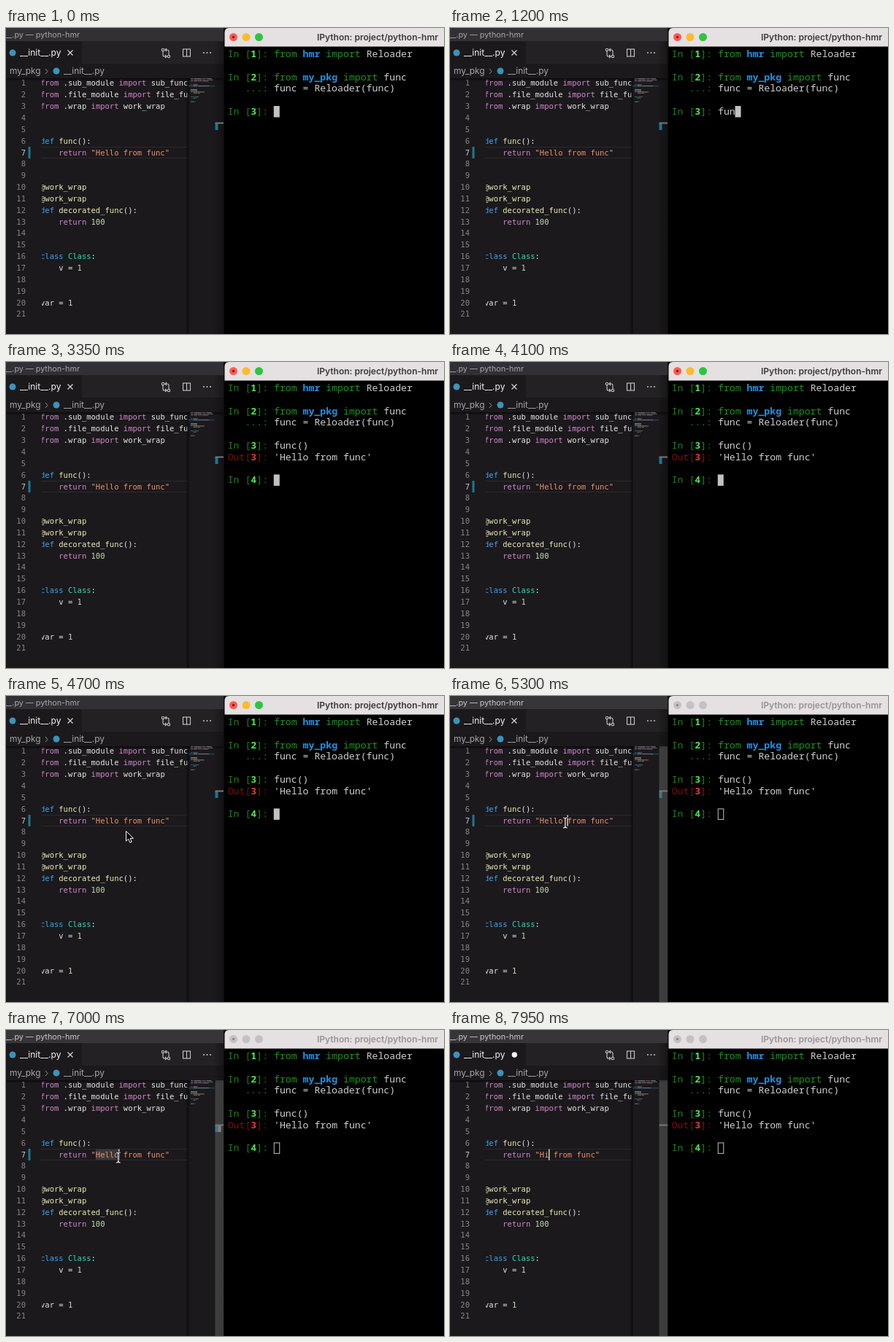
An HTML page for the animation above (8000 ms loop, 600 px wide and 420 px high).

```html
<!DOCTYPE html>
<html lang="en">
<head>
<meta charset="utf-8">
<title>Hot reload demo</title>
<style>
html, body { margin: 0; width: 100%; height: 100%; overflow: hidden; background: #1b191c; }
svg { display: block; width: 600px; height: 420px; }
text { white-space: pre; }
.ui { font-family: Inter, Roboto, sans-serif; }
.code { font: 10.5px "DejaVu Sans Mono", monospace; fill: #e6e6e6; }
.term { font: 13.2px "Noto Sans Mono", monospace; fill: #cfcfcf; }
.k { fill: #d387cd; } .d { fill: #3fa2ea; } .f { fill: #eeedb2; }
.s { fill: #ea926e; } .n { fill: #c2dcb2; } .c { fill: #30d8b8; }
.g { fill: #178517; } .G { fill: #4df04d; font-weight: 700; }
.i { fill: #1c961c; font-weight: 500; } .b { fill: #2590dc; font-weight: 700; }
.r { fill: #7d0f0c; } .R { fill: #f5372f; font-weight: 700; }
</style>
</head>
<body>
<svg viewBox="0 0 600 420">
  <defs>
    <clipPath id="pane"><rect x="49.3" y="69" width="200.7" height="351"/></clipPath>
    <linearGradient id="shade"><stop offset="0" stop-opacity="0"/><stop offset="1" stop-opacity=".35"/></linearGradient>
    <linearGradient id="edge"><stop offset="0" stop-opacity="0"/><stop offset="1" stop-opacity=".6"/></linearGradient>
    <linearGradient id="drop" x2="0" y2="1"><stop offset="0" stop-opacity=".6"/><stop offset="1" stop-opacity="0"/></linearGradient>
  </defs>
  <rect width="600" height="420" fill="#1b191c"/>
  <g class="ui">
    <rect id="bar" width="299" height="18"/>
    <text id="title" x="101" y="13" font-size="10.8" text-anchor="end">__init__.py — python-hmr</text>
    <rect y="18" width="299" height="31" fill="#232124"/>
    <rect y="18" width="104" height="31" fill="#1b191c"/>
    <circle cx="9" cy="34" r="4.5" fill="#3a94bb"/>
    <text x="19" y="38" font-size="12" fill="#f2f2f2">__init__.py</text>
    <path id="close" d="M84.5 30.5l7 7m0-7l-7 7" stroke="#d8d8d8" stroke-width="1.2"/>
    <circle id="dirty" cx="88.3" cy="34" r="3.7" fill="#f4f4f4"/>
    <g fill="none" stroke="#c8c8c8" stroke-width="1.1">
      <circle cx="215" cy="30" r="1.7"/><circle cx="223" cy="39" r="1.7"/>
      <path d="M215 32v5q0 2 2 2h3m-2-2l2 2-2 2M223 37v-5q0-2-2-2h-3m2-2l-2 2 2 2"/>
      <rect x="242.5" y="29" width="10" height="10"/><path d="M247.5 29v10"/>
    </g>
    <g fill="#c8c8c8"><circle cx="271" cy="34" r="1"/><circle cx="275.5" cy="34" r="1"/><circle cx="280" cy="34" r="1"/></g>
    <g font-size="11.9" fill="#a6a6a6">
      <text x="5" y="63">my_pkg</text><text x="79" y="63">__init__.py</text>
    </g>
    <path d="M54 56l3 3.5-3 3.5" fill="none" stroke="#909090"/>
    <circle cx="69" cy="59" r="4.5" fill="#3a94bb"/>
  </g>
  <path d="M48 163.5h202M48 178.5h202" stroke="#2c2a2d"/>
  <rect id="select" x="122.8" y="164" width="31.6" height="14" fill="#38393c"/>
  <g id="numbers" class="code" text-anchor="end"></g>
  <rect id="change" x="30.5" y="163" width="3" height="16" fill="#1a788f"/>
  <g id="code" class="code" clip-path="url(#pane)"></g>
  <rect id="caret" y="163.5" width="1.5" height="15" fill="#d0d0d0"/>
  <rect x="246" y="69" width="4.5" height="351" fill="url(#edge)"/>
  <rect y="69" width="299" height="4" fill="url(#drop)"/>
  <g id="map"></g>
  <rect x="284" y="18" width="15" height="402" fill="url(#shade)"/>
  <rect id="mark" x="286.5" y="131" width="4" height="9" fill="#1c7594"/>
  <rect id="hit" x="290.5" y="131" width="4" height="9" fill="#8b8b8b"/>
  <rect x="286.5" y="129.5" width="12" height="2" fill="#777"/>
  <rect id="slider" x="286.5" y="69" width="12" height="351" fill="#797979" opacity=".4"/>

  <rect x="298" width="302" height="420" fill="#0c0c0c"/>
  <rect x="299" y="20" width="301" height="400"/>
  <path d="M299.5 25.6V6q0-6 6-6H600V25.6z" fill="#e5e0e1"/>
  <g id="lights"></g>
  <text id="termTitle" class="ui" x="509" y="16.5" font-size="12" font-weight="600" text-anchor="middle">IPython: project/python-hmr</text>
  <g id="term" class="term"></g>
  <rect id="block"/>

  <path id="arrow" d="M0 0V13.6L3.2 10.7 5.4 15.7 7.8 14.6 5.6 9.8H10z" fill="#000" stroke="#fff"/>
  <g id="beam" fill="none" stroke-linecap="round">
    <path d="M-2.5-7q2 0 2.5 1.5Q.5-7 2.5-7M0-5.5v11M-2.5 7q2 0 2.5-1.5Q.5 7 2.5 7" stroke="#111" stroke-width="2.6"/>
    <path d="M-2.5-7q2 0 2.5 1.5Q.5-7 2.5-7M0-5.5v11M-2.5 7q2 0 2.5-1.5Q.5 7 2.5 7" stroke="#fff" stroke-width="1.2"/>
  </g>
</svg>
<script>
const LOOP = 8000;
const CODE = { x: 47, y: 79.4, w: 6.32, pitch: 15.85 };
const TERM = { x: 303.7, y: 40, w: 7.92, pitch: 15.8 };
const KEYS = [900, 1050, 1200, 1400, 1900, 2200];
const ENTER = 2900, POINTER = 4350, FOCUS = 5200, SELECT = 5750;
const TYPE_H = 7200, TYPE_I = 7500, CLEAN = 7720;

const el = Object.fromEntries([...document.querySelectorAll('[id]')].map(e => [e.id, e]));
const show = (e, on) => e.setAttribute('visibility', on ? 'visible' : 'hidden');
const set = (e, attrs) => { for (const k in attrs) e.setAttribute(k, attrs[k]); };

// Spans are written as "class:text", joined by "|"; an empty class is plain text.
const split = row => row.split('|').map(p => [p.slice(0, p.indexOf(':')), p.slice(p.indexOf(':') + 1)]);
const line = (grid, n, row) => {
  const spans = split(row).map(([c, s]) => `<tspan class="${c}">${s}</tspan>`).join('');
  return `<text x="${grid.x}" y="${grid.y + n * grid.pitch}">${spans}</text>`;
};
const lines = (grid, rows) => rows.map((r, n) => r ? line(grid, n, r) : '').join('');

const source = word => [
  'k:from|: .sub_module |k:import|: sub_func',
  'k:from|: .file_module |k:import|: file_func',
  'k:from|: .wrap |k:import|: work_wrap',
  '', '',
  'd:def |f:func|:():',
  `k:    return |s:"${word} from func"`,
  '', '',
  'f:@work_wrap', 'f:@work_wrap',
  'd:def |f:decorated_func|:():',
  'k:    return |n:100',
  '', '',
  'd:class |c:Class|::',
  ':    v = |n:1',
  '', '',
  ':var = |n:1', ''
];

const input = (n, rest) => `g:In [|G:${n}|g:]: |${rest}`;
const session = t => {
  const typed = 'func()'.slice(0, KEYS.filter(k => t >= k).length);
  const rows = [
    input(1, 'i:from |b:hmr|i: import|: Reloader'), '',
    input(2, 'i:from |b:my_pkg|i: import|: func'),
    'g:   ...: |:func = Reloader(func)', '',
    input(3, ':' + typed)
  ];
  if (t >= ENTER) rows.push("r:Out[|R:3|r:]: |:'Hello from func'", '', input(4, ':'));
  return { rows, col: t < ENTER ? 8 + typed.length : 8 };
};

function drawMap(rows) {
  let out = '<rect x="250" y="78.8" width="36" height="1.7" fill="#12435a"/>';
  rows.forEach((row, n) => {
    if (!row) return;
    let col = 0;
    for (const [c, s] of split(row)) {
      const pad = s.length - s.trimStart().length, len = s.trim().length;
      out += `<rect class="${c}" x="${253 + (col + pad) * .9}" y="${69 + n * 1.67}" width="${len * .9}" height="1" fill="#ccc" opacity=".5"/>`;
      col += s.length;
    }
  });
  el.map.innerHTML = out;
}

function drawWindows(focused) {
  set(el.bar, { fill: focused ? '#323034' : '#373538' });
  set(el.title, { fill: focused ? '#aaa6ab' : '#cbc8cb' });
  set(el.termTitle, { fill: focused ? '#3c393a' : '#989394' });
  const fills = focused ? ['#ff5b53', '#fdbb2e', '#2ac63f'] : Array(3).fill('#c5c0c1');
  el.lights.innerHTML = fills.map((f, i) => `<circle cx="${311.5 + i * 17.5}" cy="12.5" r="5.5" fill="${f}"/>`).join('') +
    `<circle cx="311.5" cy="12.5" r="1.8" fill="${focused ? '#8a1510' : '#8f8b8c'}"/>`;
}

// Pointer path as [time, x, y], eased between stops.
const PATH = [[POINTER, 226, 402], [4680, 164.5, 185.5], [4800, 164.5, 185.5], [5150, 157.8, 174],
  [5400, 157.8, 174], [5650, 153.8, 175]];
function pointerAt(t) {
  const i = PATH.findIndex(p => p[0] > t);
  if (i < 0) return PATH[PATH.length - 1].slice(1);
  const [t0, x0, y0] = PATH[Math.max(i - 1, 0)], [t1, x1, y1] = PATH[i];
  const u = Math.max(0, (t - t0) / (t1 - t0)), e = u * u * (3 - 2 * u);
  return [x0 + (x1 - x0) * e, y0 + (y1 - y0) * e];
}

let last = '';
function render(t) {
  const focused = t < FOCUS, edited = t >= TYPE_H;
  const word = t >= TYPE_I ? 'Hi' : edited ? 'H' : 'Hello';
  const { rows, col } = session(t);

  const state = [focused, word, rows.join()].join();
  if (state !== last) {
    last = state;
    const text = source(word);
    el.code.innerHTML = lines(CODE, text);
    el.term.innerHTML = lines(TERM, rows);
    drawMap(text);
    drawWindows(focused);
  }

  const x = TERM.x + col * TERM.w, y = TERM.y + (rows.length - 1) * TERM.pitch;
  set(el.block, focused
    ? { x: x - .3, y: y - 12, width: 8, height: 15.5, fill: '#c2c2c2', stroke: 'none' }
    : { x: x + .2, y: y - 11.5, width: 7.5, height: 14.5, fill: 'none', stroke: '#c2c2c2' });

  const selected = t >= SELECT && !edited;
  show(el.select, selected);
  show(el.hit, selected);
  show(el.slider, !focused);
  show(el.change, t < CLEAN);
  show(el.mark, t < CLEAN);
  show(el.close, !edited);
  show(el.dirty, edited);

  const [since, at] = t >= TYPE_I ? [TYPE_I, 14] : edited ? [TYPE_H, 13] : selected ? [SELECT, 17] : [FOCUS, 18];
  set(el.caret, { x: CODE.x + at * CODE.w - .5 });
  show(el.caret, !focused && (t - since) % 1000 < 500);

  const pos = `translate(${pointerAt(t)})`;
  set(el.arrow, { transform: pos });
  set(el.beam, { transform: pos });
  show(el.arrow, t >= POINTER && focused);
  show(el.beam, !focused && !edited);
}

el.numbers.innerHTML = source('').map((_, n) =>
  `<text x="27" y="${CODE.y + n * CODE.pitch}" fill="${n === 6 ? '#c6c6c6' : '#868686'}">${n + 1}</text>`).join('');

const start = performance.now();
(function tick() {
  render((performance.now() - start) % LOOP);
  requestAnimationFrame(tick);
})();
</script>
</body>
</html>
```
